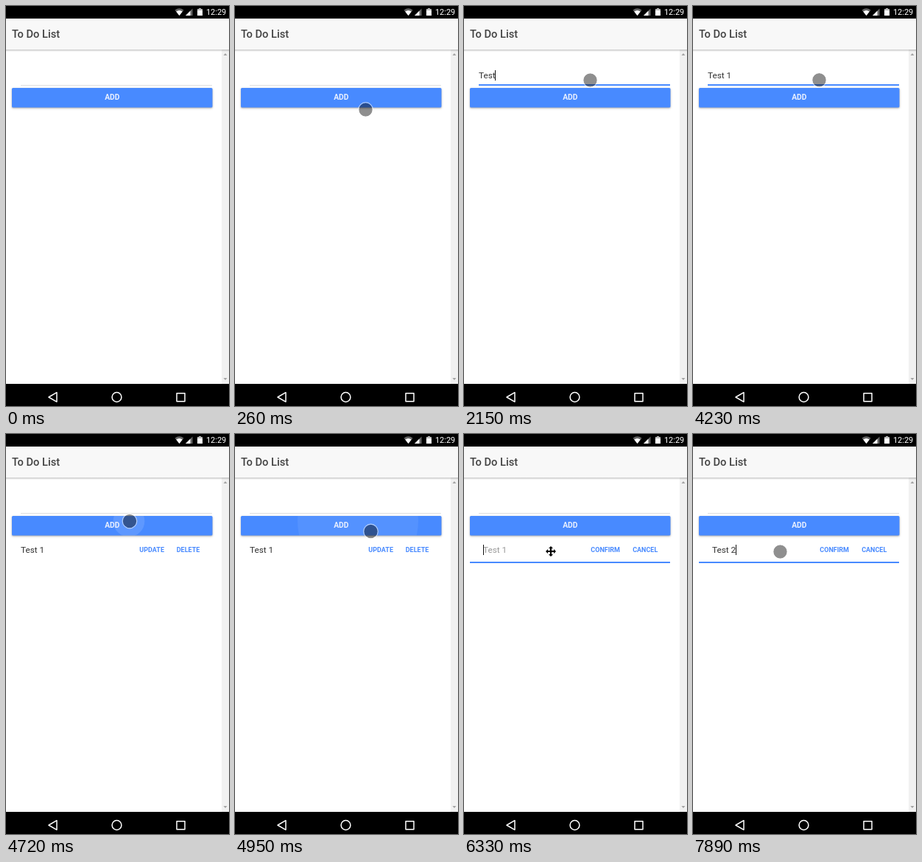
An HTML page with a canvas for the animation above (8000 ms loop, 303 px wide and 542 px high).

```html
<!DOCTYPE html>
<html lang="en">
<head>
<meta charset="utf-8">
<title>To Do List</title>
<style>
html, body { margin: 0; width: 100%; height: 100%; overflow: hidden; background: #fff; }
canvas { display: block; width: 303px; height: 542px; }
</style>
</head>
<body>
<canvas id="stage"></canvas>
<script>
const W = 303, H = 542, LOOP = 8000;
const BLUE = '#488aff', INK = '#333';
const canvas = document.getElementById('stage');
const ctx = canvas.getContext('2d');
const dpr = window.devicePixelRatio || 1;
canvas.width = W * dpr;
canvas.height = H * dpr;

const FONT = 'Roboto, sans-serif';
const BODY = '400 11.8px ' + FONT;
const SMALL = '700 9px ' + FONT;

// [time, text, caret visible]
const newTask = [
  [0, '', 0], [1010, '', 1], [1480, '', 0], [1680, 'T', 1], [1920, 'Te', 1],
  [2000, 'Tes', 1], [2150, 'Test', 1], [2640, 'Test', 0], [3110, 'Test ', 1],
  [3260, 'Test 1', 1], [3750, 'Test 1', 0], [4250, 'Test 1', 1], [4640, '', 0]
];
const editTask = [
  [0, '', 0], [5970, '', 1], [6440, '', 0], [6670, 'T', 1], [6870, 'Te', 1],
  [7000, 'Tes', 1], [7150, 'Test', 1], [7640, 'Test', 0], [7770, 'Test ', 1],
  [7890, 'Test 2', 1]
];
const ADD = 4640, EDIT = 5540, FOCUS = 5970;

// Pointer stops: [time, x, y]
const path = [
  [20, 253.5, 512.5], [260, 177.5, 140.5], [360, 177.5, 140.5], [810, 171.5, 100.5],
  [3930, 171.5, 100.5], [3931, 171.5, 100.2], [4230, 171.5, 100.2], [4380, 168, 118],
  [4830, 168, 118], [4950, 184.5, 132], [5250, 196, 155.5],
  [5550, 196, 155.5], [5740, 118.5, 159.5]
];
// Shift held down: the pointer turns into a move cross
const shiftHeld = [[1300, 1760], [6330, 6750]];

const between = (t, a, b) => t >= a && t < b;
const easeOut = p => 1 - (1 - p) * (1 - p);
const ease = p => p * p * (3 - 2 * p);

function rect(x, y, w, h, color) {
  ctx.fillStyle = color;
  ctx.fillRect(x, y, w, h);
}

function poly(points, color) {
  ctx.beginPath();
  points.forEach(([x, y]) => ctx.lineTo(x, y));
  ctx.closePath();
  ctx.fillStyle = color;
  ctx.fill();
}

function disc(x, y, r, color) {
  ctx.beginPath();
  ctx.arc(x, y, r, 0, Math.PI * 2);
  ctx.fillStyle = color;
  ctx.fill();
}

function label(text, x, y, font, color, align = 'left') {
  ctx.font = font;
  ctx.fillStyle = color;
  ctx.textAlign = align;
  ctx.fillText(text, x, y);
}

function stateAt(list, t) {
  let current = list[0];
  for (const s of list) if (t >= s[0]) current = s;
  return { text: current[1], caret: current[2] };
}

function field(state, x, top, placeholder = '') {
  const shown = state.text || placeholder;
  label(shown, x, top + 11, BODY, state.text ? INK : '#999');
  if (state.caret) {
    ctx.font = BODY;
    rect(Math.floor(x + ctx.measureText(state.text).width), top, 1, 14, '#111');
  }
}

function underline(x, bottom, focused) {
  if (focused) rect(x, bottom - 2, 280 - x, 2, BLUE);
  else rect(x, bottom - 1, 280 - x, 1, '#dedede');
}

function statusBar() {
  rect(0, 0, W, 17, '#000');
  ctx.beginPath();
  ctx.moveTo(235.5, 13);
  ctx.lineTo(229.5, 5.5);
  ctx.quadraticCurveTo(235.5, 1, 241.5, 5.5);
  ctx.closePath();
  ctx.fillStyle = '#666';
  ctx.fill();
  ctx.beginPath();
  ctx.moveTo(235.5, 13);
  ctx.lineTo(231.2, 7.6);
  ctx.quadraticCurveTo(235.5, 4.6, 239.8, 7.6);
  ctx.closePath();
  ctx.fillStyle = '#fff';
  ctx.fill();
  poly([[244, 13], [253.5, 13], [253.5, 3.5]], '#666');
  poly([[244, 13], [250.5, 13], [250.5, 6.5]], '#fff');
  rect(262, 3, 3, 1, '#bbb');
  rect(260, 4, 7, 2, '#bbb');
  rect(260, 6, 7, 7, '#fff');
  label('12:29', 299.3, 12, '400 11px ' + FONT, '#fff', 'right');
}

function header() {
  rect(0, 17, W, 42, '#f8f8f8');
  const shade = ctx.createLinearGradient(0, 59, 0, 62);
  shade.addColorStop(0, 'rgba(0,0,0,.22)');
  shade.addColorStop(1, 'rgba(0,0,0,0)');
  rect(0, 59, W, 3, shade);
  label('To Do List', 8, 43, '500 14.7px ' + FONT, '#424242');
}

function navBar() {
  rect(0, 512, W, 30, '#000');
  ctx.strokeStyle = '#fff';
  ctx.lineWidth = 1.5;
  ctx.lineJoin = 'round';
  ctx.beginPath();
  ctx.moveTo(58, 530);
  ctx.lineTo(69, 523.7);
  ctx.lineTo(69, 536.3);
  ctx.closePath();
  ctx.stroke();
  ctx.beginPath();
  ctx.arc(150.5, 530, 6.4, 0, Math.PI * 2);
  ctx.stroke();
  ctx.strokeRect(232, 524.7, 11, 11);
}

function scrollBar() {
  rect(293, 59, 10, 453, '#f1f1f1');
  poly([[295.5, 67], [300.5, 67], [298, 64]], '#a3a3a3');
  poly([[295.5, 504], [300.5, 504], [298, 507]], '#a3a3a3');
}

function addButton(t) {
  ctx.save();
  ctx.beginPath();
  ctx.roundRect(8, 111, 272.5, 26.5, 1.5);
  ctx.save();
  ctx.shadowColor = 'rgba(0,0,0,.35)';
  ctx.shadowBlur = 2.5 * dpr;
  ctx.shadowOffsetY = 1 * dpr;
  ctx.fillStyle = BLUE;
  ctx.fill();
  ctx.restore();
  ctx.clip();
  if (between(t, ADD, 5220)) {
    const p = (t - ADD) / 580;
    disc(167, 118, 153 * p, `rgba(255,255,255,${0.14 * (1 - p)})`);
  }
  ctx.restore();
  label('ADD', 144.3, 127.2, '700 10.3px ' + FONT, '#e9f0ff', 'center');
}

function taskRow(t) {
  if (t < ADD) return;
  const editing = t >= EDIT;
  if (editing) {
    underline(8, 175, t >= FOCUS);
    field(stateAt(editTask, t), 26, 150, 'Test 1');
  } else {
    label('Test 1', 20, 161, BODY, INK);
  }
  label(editing ? 'CONFIRM' : 'UPDATE', editing ? 212 : 215, 160, SMALL, BLUE, 'right');
  label(editing ? 'CANCEL' : 'DELETE', 263.3, 160, SMALL, BLUE, 'right');
}

function pointerAt(t) {
  const last = path[path.length - 1];
  if (t >= last[0]) return [last[1], last[2]];
  const i = path.findIndex(s => s[0] > t);
  const [t0, x0, y0] = path[i - 1], [t1, x1, y1] = path[i];
  const p = (i === 1 ? easeOut : ease)((t - t0) / (t1 - t0));
  return [x0 + (x1 - x0) * p, y0 + (y1 - y0) * p];
}

function moveCross(x, y) {
  const arm = [[-1, -1], [-1, -4], [-3, -4], [0, -7], [3, -4], [1, -4]];
  const points = [];
  for (let k = 0; k < 4; k++) {
    const c = [1, 0, -1, 0][k], s = [0, 1, 0, -1][k];
    arm.forEach(([a, b]) => points.push([x + a * c - b * s, y + a * s + b * c]));
  }
  poly(points, '#000');
  ctx.strokeStyle = '#fff';
  ctx.lineWidth = 1.6;
  ctx.stroke();
  poly(points, '#000');
}

function pointer(t) {
  if (t < 20) return;
  const [x, y] = pointerAt(t);
  if (shiftHeld.some(([a, b]) => between(t, a, b))) {
    moveCross(x - 0.5, y - 0.5);
    return;
  }
  disc(x, y, 9.3, 'rgba(0,0,0,.44)');
  ctx.beginPath();
  ctx.arc(x, y, 9.8, 0, Math.PI * 2);
  ctx.strokeStyle = 'rgba(255,255,255,.55)';
  ctx.lineWidth = 1.2;
  ctx.stroke();
}

function draw(t) {
  ctx.setTransform(dpr, 0, 0, dpr, 0, 0);
  rect(0, 0, W, H, '#fff');
  scrollBar();
  header();
  statusBar();
  navBar();
  underline(20, 108, between(t, 1010, ADD));
  field(stateAt(newTask, t), 20, 87);
  addButton(t);
  taskRow(t);
  pointer(t);
}

const start = performance.now();
function tick() {
  draw((performance.now() - start) % LOOP);
  requestAnimationFrame(tick);
}
tick();
</script>
</body>
</html>
```
